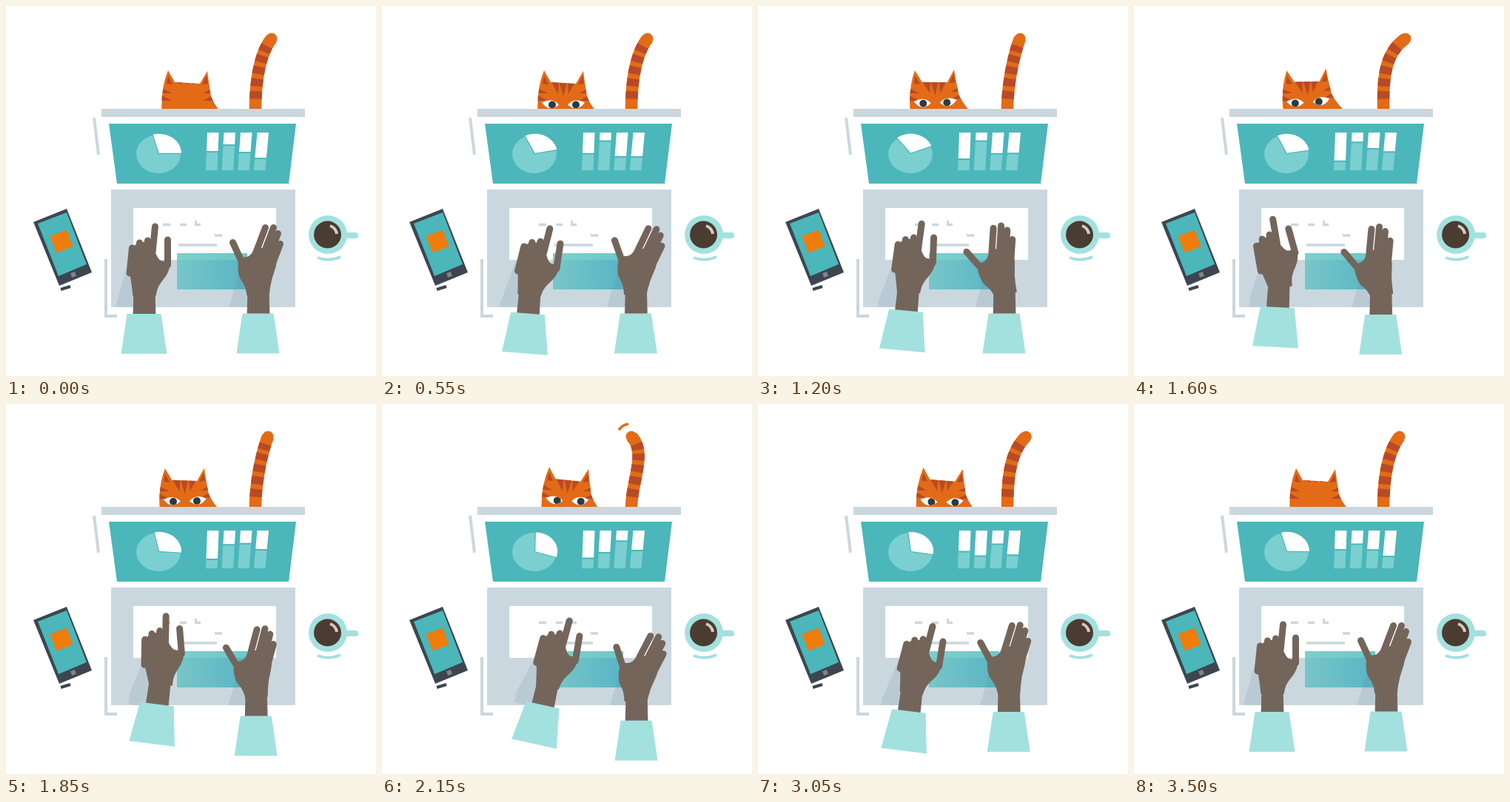
Animation, 500 px wide and 500 px high, one loop 3.55 s. Source, as an HTML page with a canvas:

```html
<!DOCTYPE html>
<html lang="en">
<head>
<meta charset="utf-8">
<title>Desk with a curious cat</title>
<style>
html, body { margin: 0; width: 100%; height: 100%; overflow: hidden; background: #fff; }
canvas { display: block; width: 100vw; height: 100vh; }
</style>
</head>
<body>
<canvas id="stage" width="500" height="500"></canvas>
<script>
const ctx = document.getElementById('stage').getContext('2d');
const LOOP = 3550, STEP = 50;
const GREY = '#cbd7df', TEAL = '#4bb7ba', PALE = '#7bcfd0', MINT = '#a3e1df';
const SKIN = '#74655b', ORANGE = '#e36b17', RUST = '#b84a25', DARK = '#3d4650';

// Each part follows one scalar that rests at these moments.
const REST = [0, 550, 1200, 1600, 2150, 2650, 3500];
const MOTION = {
  leftLean: [0, 4.3, 5.5, 3, 12.5, 13],
  leftTurn: [0, 8.5, 2, -15.5, 9.5, 16.5],
  rightTurn: [0, 5, -17, -15.5, 6.5, -7],
  head: [0, 0, -5, -9, 5, 6],
  tail: [0, 0, -5, 8, -22, 6]
};

const LEFT_HAND = {
  palm: [[-15, 10], [-17, -8], [-21, -30], [-20, -58], [10, -66], [16, -46], [23, -36],
    [35, -39], [34, -22], [19, -4], [16, 10]],
  tips: [[15, -84], [5, -65], [-6, -62], [-16, -55]], slant: -0.1,
  thumb: [32, -66], thumbSlant: 0,
  cuff: 23
};
const RIGHT_HAND = {
  palm: [[-15, 10], [-17, -4], [-27, -16], [-27, -42], [-12, -42], [-5, -53], [9, -55],
    [20, -49], [27, -36], [18, -12], [15, 10]],
  tips: [[10, -82], [21, -82], [27, -74], [30, -60]], slant: -0.38,
  thumb: [-34, -62], thumbSlant: 0.46,
  cuff: 21
};

const rad = deg => deg * Math.PI / 180;
const clamp = v => Math.max(0, Math.min(1, v));
const ease = v => { v = clamp(v); return v * v * (3 - 2 * v); };
const ramp = (t, from, to) => ease((t - from) / (to - from));
const bump = (t, center, width) => Math.exp(-(((t - center) / width) ** 2));
const wave = (t, lag = 0, cycles = 1) => Math.cos(2 * Math.PI * cycles * t / LOOP - rad(lag));

function follow(name, t) {
  const keys = MOTION[name];
  let i = 0;
  while (i < keys.length - 1 && t >= REST[i + 1]) i++;
  const next = keys[(i + 1) % keys.length];
  return keys[i] + (next - keys[i]) * ramp(t, REST[i], REST[i + 1]);
}

function poly(points, color) {
  ctx.beginPath();
  points.forEach(p => ctx.lineTo(...p));
  ctx.closePath();
  ctx.fillStyle = color;
  ctx.fill();
}

function line(points, color, width, cap = 'butt') {
  ctx.beginPath();
  points.forEach(p => ctx.lineTo(...p));
  ctx.strokeStyle = color;
  ctx.lineWidth = width;
  ctx.lineCap = cap;
  ctx.stroke();
}

function curve([x0, y0], [cx, cy], [x1, y1], color, width) {
  ctx.beginPath();
  ctx.moveTo(x0, y0);
  ctx.quadraticCurveTo(cx, cy, x1, y1);
  ctx.strokeStyle = color;
  ctx.lineWidth = width;
  ctx.lineCap = 'butt';
  ctx.stroke();
}

function rect(x, y, w, h, color) {
  ctx.fillStyle = color;
  ctx.fillRect(x, y, w, h);
}

function disc(x, y, r, color) {
  ctx.beginPath();
  ctx.arc(x, y, r, 0, 2 * Math.PI);
  ctx.fillStyle = color;
  ctx.fill();
}

function placed(x, y, deg, paint) {
  ctx.save();
  ctx.translate(x, y);
  ctx.rotate(rad(deg));
  paint();
  ctx.restore();
}

function drawTail(t) {
  const bend = follow('tail', t);
  const xs = [337, 337, 342 - 0.75 * bend, 359 + bend];
  const ys = [141, 105, 65, 44];
  const bezier = (p, u) => {
    const v = 1 - u;
    return v * v * v * p[0] + 3 * v * v * u * p[1] + 3 * v * u * u * p[2] + u * u * u * p[3];
  };
  const span = (from, to) => Array.from({ length: 25 }, (_, i) => {
    const u = from + (to - from) * i / 24;
    return [bezier(xs, u), bezier(ys, u)];
  });
  line(span(0, 1), ORANGE, 16.5);
  line(span(0.9, 1), ORANGE, 15, 'round');
  for (let u = 0.19; u < 0.85; u += 0.155) line(span(u - 0.048, u + 0.048), RUST, 16.5);
  if (t >= 2050 && t < 2350) curve([320, 35], [325, 28], [333, 27], ORANGE, 3.5);
}

function drawEye(side, gaze) {
  ctx.save();
  ctx.beginPath();
  ctx.moveTo(side * 29, -10);
  ctx.quadraticCurveTo(side * 15, -17, side * 6, -7);
  ctx.quadraticCurveTo(side * 19, 4, side * 29, -10);
  ctx.fillStyle = '#fff';
  ctx.fill();
  ctx.clip();
  disc(side * 16 + gaze, -7, 5, '#2c3b42');
  ctx.restore();
}

function drawCat(t) {
  const lean = follow('head', t);
  const look = ramp(t, 100, 400) * (1 - ramp(t, 3000, 3300));
  const lift = 1.5 * ramp(t, 550, 1100);
  ctx.save();
  ctx.beginPath();
  ctx.rect(0, 0, 500, 140);
  ctx.clip();
  placed(245 + lean, 139 - Math.abs(lean) / 5, lean * 0.45, () => {
    ctx.beginPath();
    ctx.moveTo(-34, 10);
    ctx.quadraticCurveTo(-37, -25, -26, -52);
    ctx.lineTo(-17, -36);
    ctx.lineTo(17, -34);
    ctx.lineTo(27, -51);
    ctx.quadraticCurveTo(29, -35, 32, -17);
    ctx.quadraticCurveTo(36, -6, 48, 8);
    ctx.fillStyle = ORANGE;
    ctx.fill();
    ctx.clip();
    for (const s of [-1, 1]) {
      poly([[s * 26, -45], [s * 28, -34], [s * 20, -33]], RUST);
      for (const y of [-25, -15]) poly([[s * 36, y - 4], [s * 36, y + 4], [s * 21, y + 4]], RUST);
    }
    for (const s of [-1, 0, 1])
      poly([[s * 11 - 5, -36], [s * 11 + 5, -36], [s * 7, -33 + (16 - 3 * Math.abs(s)) * look]], RUST);
    ctx.translate(0, 18 * (1 - look) + 1.5 - lift);
    for (const s of [-1, 1]) drawEye(s, 1 + 0.3 * lean);
  });
  ctx.restore();
}

function wedge(x, y, from, to, color) {
  ctx.beginPath();
  ctx.moveTo(x, y);
  ctx.ellipse(x, y, 30, 26, 0, rad(from), rad(to));
  ctx.fillStyle = color;
  ctx.fill();
}

function drawBar(index, level) {
  const top = 272 + index * 22.5, lean = 2 + index * 0.9;
  const band = (y0, y1, color) => {
    const left = y => top - lean * (y - 171) / 51;
    poly([[left(y0), y0], [left(y0) + 15.5, y0], [left(y1) + 15.5, y1], [left(y1), y1]], color);
  };
  band(171, level - 1, '#fff');
  band(level + 1, 222, PALE);
}

function drawCharts(t) {
  poly([[139, 159], [392, 159], [382, 240], [150, 240]], TEAL);
  const turn = -19 * wave(t, 90) + 6 * wave(t, 90, 2);
  const middle = rad(turn - 53);
  wedge(206, 200, turn, turn + 254, PALE);
  wedge(206 + 1.5 * Math.cos(middle), 200 + 1.5 * Math.sin(middle), turn - 106, turn, '#fff');
  drawBar(0, 203.5 - 6.5 * wave(t));
  drawBar(1, 193 - 15 * wave(t, 90) - 5 * wave(t, 0, 2));
  drawBar(2, 194 + 10 * wave(t, 66));
  drawBar(3, 201.5 + 4.5 * wave(t));
}

function drawKeyboard() {
  rect(142, 248, 249, 159, GREY);
  rect(172, 273, 193, 70, '#fff');
  for (const [x, y, w] of [[212, 295.5, 10], [235, 295.5, 9], [255, 295.5, 8], [282, 310, 10], [233, 323, 52]])
    line([[x, y], [x + w, y]], GREY, 3.5);
  rect(255, 290, 3, 6, GREY);
  const glow = ctx.createLinearGradient(231, 0, 326, 0);
  glow.addColorStop(0, '#78c6c7');
  glow.addColorStop(1, '#58b5c5');
  rect(231, 334, 95, 49, glow);
  rect(231, 334, 95, 9, 'rgba(130,220,208,.5)');
}

function drawPhone() {
  poly([[37, 292], [82, 274], [116, 360], [72, 378]], DARK);
  poly([[43, 294], [82, 279], [109, 349], [71, 365]], TEAL);
  placed(75, 318, -21, () => rect(-12, -12, 24, 24, '#f07c0c'));
  placed(91, 363, -21, () => rect(-3, -3, 6, 6, '#7d868d'));
  line([[74, 383], [87, 379]], DARK, 4);
}

function drawCup() {
  line([[455, 310], [472, 310]], MINT, 8, 'round');
  disc(435, 309, 26, MINT);
  disc(434.5, 309, 18.5, '#4a3c31');
  curve([438, 297], [446, 300], [447, 308], '#d3cbc1', 4);
  curve([421, 340], [436, 346], [452, 339], MINT, 4);
}

function drawHand({ palm, tips, slant, thumb, thumbSlant }) {
  const finger = ([x, y], lean) => line([[x, y], [x + lean * 34, y + 34]], SKIN, 9, 'round');
  ctx.beginPath();
  ctx.moveTo(...palm[0]);
  for (let i = 1; i < palm.length - 1; i++) {
    const [x, y] = palm[i], [nx, ny] = palm[i + 1];
    ctx.quadraticCurveTo(x, y, (x + nx) / 2, (y + ny) / 2);
  }
  ctx.lineTo(...palm[palm.length - 1]);
  ctx.fillStyle = SKIN;
  ctx.fill();
  tips.forEach(tip => finger(tip, slant));
  finger(thumb, thumbSlant);
}

function drawShadow({ x, y, lean }) {
  ctx.save();
  ctx.beginPath();
  ctx.rect(142, 343, 249, 64);
  ctx.clip();
  placed(x, y, lean, () =>
    poly([[-20, -75], [-38, -12], [-38, 5], [10, 5], [0, -75]], 'rgba(100,130,155,.16)'));
  ctx.restore();
}

function drawArm(hand, { x, y, lean, turn }) {
  placed(x, y, lean, () => {
    poly([[-15, 5], [-14, -34], [15, -34], [16, 5]], SKIN);
    placed(0, -34, turn - lean, () => {
      disc(0, 0, 15, SKIN);
      drawHand(hand);
    });
    const c = hand.cuff;
    poly([[-c, 0], [c, 0], [c + 8, 54], [-c - 8, 54]], MINT);
  });
}

function draw(t) {
  rect(0, 0, 500, 500, '#fff');
  drawTail(t);
  drawCat(t);
  rect(129, 139, 275, 11, GREY);
  drawCharts(t);
  drawKeyboard();
  line([[119, 151], [125, 201]], GREY, 4);
  line([[135, 342], [135, 419], [150, 419]], GREY, 4);
  drawPhone();
  drawCup();

  const leftLean = follow('leftLean', t), rightTurn = follow('rightTurn', t);
  const left = {
    x: 186.5 + 2.45 * leftLean, y: 416 - 10.5 * bump(t, 1900, 750),
    lean: leftLean, turn: follow('leftTurn', t)
  };
  const right = {
    x: 340.5 + 0.47 * rightTurn, y: 415.5 + 13 * bump(t, 2250, 450),
    lean: 0, turn: rightTurn
  };
  drawShadow(left);
  drawShadow(right);
  drawArm(LEFT_HAND, left);
  drawArm(RIGHT_HAND, right);
}

const start = performance.now();
function tick() {
  const t = (performance.now() - start) % LOOP;
  draw(Math.floor(t / STEP) * STEP);
  requestAnimationFrame(tick);
}
tick();
</script>
</body>
</html>
```
